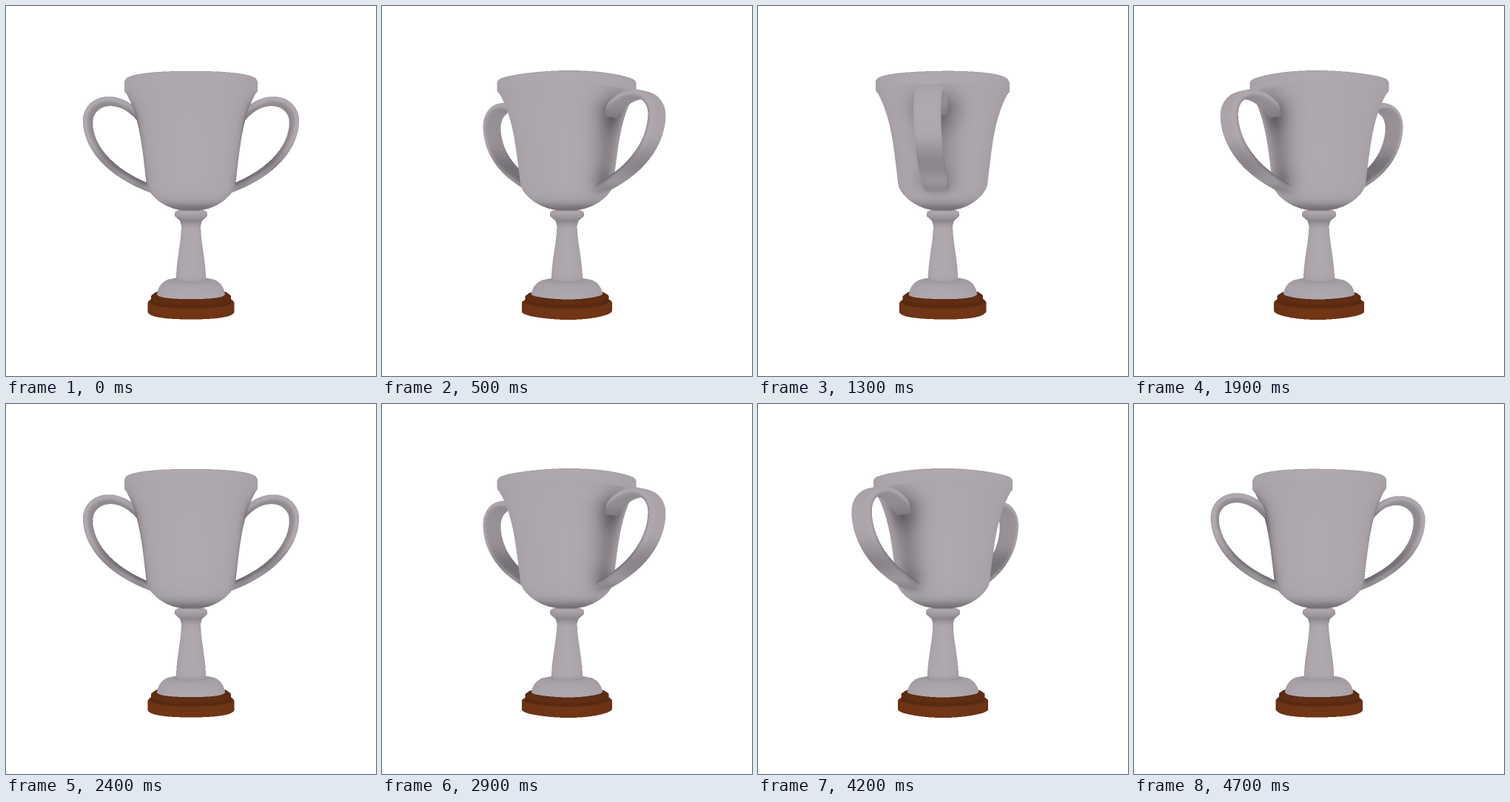
Write an HTML page with a canvas that moves like this. It is 500x500 px and loops after 4.8 s.

```html
<!DOCTYPE html>
<html>
<head>
<meta charset="utf-8">
<title>Turning trophy</title>
<style>
html, body { margin: 0; width: 100%; height: 100%; overflow: hidden; background: #fff; }
canvas { display: block; width: 500px; height: 500px; }
</style>
</head>
<body>
<canvas id="stage" width="500" height="500"></canvas>
<script>
const STEP = 100, STEPS = 48, CAM = 943, SS = 2, TAU = 2 * Math.PI;
const SILVER = [176, 168, 175], BROWN = [113, 54, 22];
const ctx = document.getElementById('stage').getContext('2d');

const gauss = (x, s) => Math.exp(-(x / s) * (x / s));
const smooth = (a, b, x) => {
  const t = Math.min(1, Math.max(0, (x - a) / (b - a)));
  return t * t * (3 - 2 * t);
};
const bezier = (a, b, c, d, t) => {
  const s = 1 - t;
  return [0, 1].map(m => s * s * s * a[m] + 3 * s * s * t * b[m] + 3 * s * t * t * c[m] + t * t * t * d[m]);
};
// Samples [y, radius(y)] from y = a to y = b
const profile = (a, b, n, radius) => Array.from({ length: n + 1 }, (_, i) => {
  const y = a + (b - a) * i / n;
  return [y, radius(y)];
});

const meshes = [];

// Grid of points with normals; each row closes on itself
function addMesh(rows, color, shade) {
  const n = rows[0].length, last = rows.length - 1;
  const verts = [], tris = [];
  rows.forEach((row, i) => row.forEach((p, j) => {
    const a = rows[Math.max(0, i - 1)][j], b = rows[Math.min(last, i + 1)][j];
    const c = row[(j + n - 1) % n], d = row[(j + 1) % n];
    const u = [0, 1, 2].map(k => b[k] - a[k]), v = [0, 1, 2].map(k => d[k] - c[k]);
    const nx = u[1] * v[2] - u[2] * v[1], ny = u[2] * v[0] - u[0] * v[2], nz = u[0] * v[1] - u[1] * v[0];
    const len = Math.hypot(nx, ny, nz) || 1;
    verts.push({ p, nx: nx / len, nz: nz / len, s: shade(p, j / n) });
    if (i < last) {
      const q = i * n + j, r = i * n + (j + 1) % n;
      tris.push([q, r, q + n], [r, r + n, q + n]);
    }
  }));
  meshes.push({ verts, tris, color });
}

// Slightly squared solid of revolution
function lathe(outline, color, shade) {
  const n = 48;
  addMesh(outline.map(([y, r]) => Array.from({ length: n }, (_, j) => {
    const a = j / n * TAU, q = r * (1 + 0.05 * Math.sin(2 * a) ** 2);
    return [q * Math.cos(a), y, q * Math.sin(a)];
  })), color, shade);
}

function cupRadius(y) {
  const u = (-10 - y) / 121;
  return u > 0 ? 60 + 14 * u + 13 * u ** 4 : 60 * Math.sqrt(1 - ((y + 10) / 37.5) ** 1.6);
}
function cupShade([x, y, z]) {
  const off = Math.atan2(Math.abs(z), Math.abs(x));
  const side = 0.2 * gauss(off, 0.36) * smooth(-125, -100, y) * (1 - smooth(-20, 10, y));
  const joint = 0.26 * gauss(off, 0.34) * gauss(y + 103, 25);
  const foot = 0.12 * gauss(off, 0.36) * gauss(y + 10, 16);
  return 1 - side - joint - foot - 0.3 * gauss(y - 25, 9);
}
// Darkens a tier near the radius where the part above meets it
const ring = (r, w, amount) => ([x, , z]) => 1 - amount * gauss(Math.hypot(x, z) - r, w);

lathe([[-147, 80], [-147, 88.5], [-145, 89.5], [-134, 89.5], [-131, 87]], SILVER, () => 1);
lathe(profile(-131, 27, 48, cupRadius), SILVER, cupShade);
lathe([[26, 18], [29, 22], [34, 22], [41, 14]], SILVER, ([, y]) => 1 - 0.2 * smooth(31, 38, y));
lathe(profile(40, 121, 24, y => 13 + 7 * smooth(45, 118, y) + 2 * gauss(y - 40, 4)), SILVER,
  ([, y]) => 1 - 0.2 * gauss(y - 38, 7) - 0.08 * gauss(y - 122, 5));
lathe([[120, 16], ...profile(120, 142, 14, y => 27 + 19 * Math.sqrt(1 - ((142 - y) / 22) ** 2))], SILVER,
  ring(17, 8, 0.1));
lathe([[139, 42], [139, 50], [142, 54], [149, 54]], BROWN, ([, y]) => 0.88 - 0.12 * smooth(144, 149, y));
lathe([[149, 52], [149, 57], [150.5, 58.3], [162, 58.3], [163, 57]], BROWN, ring(52, 4, 0.2));

function handle(dir) {
  const n = 20, half = 24, tip = [139.3, -94];
  const path = Array.from({ length: 2 * half + 1 }, (_, i) => i < half
    ? bezier([62, -89], [92, -137], [139.3, -125], tip, i / half)
    : bezier(tip, [139.3, -62], [113, -24], [48, -1], i / half - 1));
  const bend = v => Math.sign(v) * Math.sqrt(Math.abs(v));
  const rows = path.map(([r, y], i) => {
    const a = path[Math.max(0, i - 1)], b = path[Math.min(2 * half, i + 1)];
    const dx = b[0] - a[0], dy = b[1] - a[1], len = Math.hypot(dx, dy);
    return Array.from({ length: n }, (_, j) => {
      const t = j / n * TAU, out = 5.4 * bend(Math.cos(t)), w = 16 * bend(Math.sin(t));
      return [dir * (r + out * dy / len), y - out * dx / len, dir * w];
    });
  });
  addMesh(rows, SILVER, ([x, y], v) => {
    const inner = Math.cos(v * TAU) < -0.3 ? 0.12 : 0;
    const low = smooth(-70, -32, y) * (1 - smooth(-32, 0, y));
    return 1 - inner - 0.18 * low - 0.16 * gauss(Math.abs(x) - 66, 14);
  });
}
handle(1);
handle(-1);

// Working window of the stage that holds the trophy
const X0 = 98, Y0 = 82, W = 306 * SS, H = 348 * SS;
const layer = document.createElement('canvas');
layer.width = W;
layer.height = H;
const lctx = layer.getContext('2d');
const image = lctx.createImageData(W, H);
const depth = new Float32Array(W * H);

function fill(a, b, c, color) {
  const area = (b.x - a.x) * (c.y - a.y) - (b.y - a.y) * (c.x - a.x);
  if (Math.abs(area) < 1e-6) return;
  const x0 = Math.max(0, Math.ceil(Math.min(a.x, b.x, c.x))), x1 = Math.min(W - 1, Math.max(a.x, b.x, c.x));
  const y0 = Math.max(0, Math.ceil(Math.min(a.y, b.y, c.y))), y1 = Math.min(H - 1, Math.max(a.y, b.y, c.y));
  for (let y = y0; y <= y1; y++) {
    for (let x = x0; x <= x1; x++) {
      const u = ((b.x - x) * (c.y - y) - (b.y - y) * (c.x - x)) / area;
      const v = ((c.x - x) * (a.y - y) - (c.y - y) * (a.x - x)) / area;
      const w = 1 - u - v;
      if (u < -1e-6 || v < -1e-6 || w < -1e-6) continue;
      const k = u * a.k + v * b.k + w * c.k, i = y * W + x;
      if (k <= depth[i]) continue;
      depth[i] = k;
      const s = u * a.s + v * b.s + w * c.s;
      for (let m = 0; m < 3; m++) image.data[i * 4 + m] = color[m] * s;
      image.data[i * 4 + 3] = 255;
    }
  }
}

function render(angle) {
  const co = Math.cos(angle), si = Math.sin(angle);
  image.data.fill(0);
  depth.fill(0);
  for (const { verts, tris, color } of meshes) {
    const pts = verts.map(({ p, nx, nz, s }) => {
      const k = 1 / (1 - (p[0] * si + p[2] * co) / CAM);
      return {
        x: (250 + (p[0] * co - p[2] * si) * k - X0) * SS - 0.5,
        y: (250 + p[1] * k - Y0) * SS - 0.5,
        k, s: s * (0.93 + 0.07 * Math.abs(nx * si + nz * co))
      };
    });
    for (const [a, b, c] of tris) fill(pts[a], pts[b], pts[c], color);
  }
  lctx.putImageData(image, 0, 0);
  const view = document.createElement('canvas');
  view.width = view.height = 500;
  view.getContext('2d').drawImage(layer, X0, Y0, W / SS, H / SS);
  return view;
}

// The trophy looks the same after half a turn
const views = [];
let shown = -1;
function tick() {
  const step = Math.floor(performance.now() / STEP) % STEPS;
  if (step !== shown) {
    const half = step % (STEPS / 2);
    views[half] = views[half] || render(half / STEPS * TAU);
    ctx.fillStyle = '#fff';
    ctx.fillRect(0, 0, 500, 500);
    ctx.drawImage(views[half], 0, 0);
    shown = step;
  }
  requestAnimationFrame(tick);
}
tick();
</script>
</body>
</html>
```
